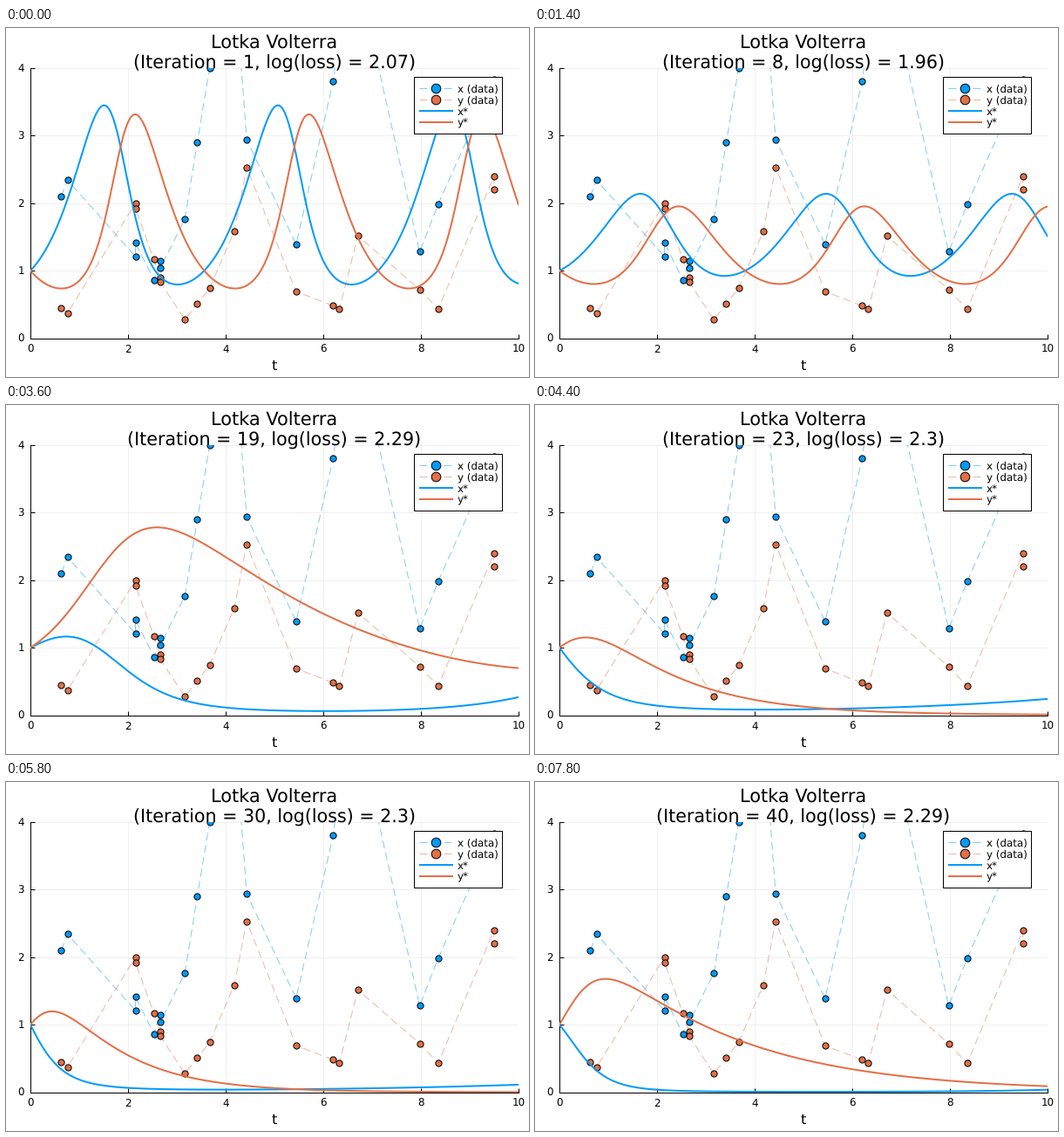
A matplotlib script for the animation above (8 s loop, 600 by 400 pixels).

```python
import numpy as np
import matplotlib.pyplot as plt
from matplotlib.animation import FuncAnimation
from matplotlib.patches import Rectangle

W, H, DPI = 600, 400, 100
PT = 72 / DPI
LEFT, RIGHT, TOP, BOTTOM = 28, 588, 46, 355.5
BLUE, ORANGE = "#009AFA", "#E36F47"
FRAMES, INTERVAL = 40, 200
T_END, STEPS = 10.0, 200
DT = T_END / STEPS

plt.rcParams.update({"font.family": "DejaVu Sans", "text.hinting": "none"})

# Noisy samples on a grid of 80 times: (grid index, x, y)
SAMPLES = [
    (5, 2.1, 0.45), (6, 2.34, 0.37), (17, 1.21, 2.0), (17, 1.41, 1.92),
    (20, 0.865, 1.165), (21, 1.145, 0.9), (21, 1.035, 0.83),
    (25, 1.765, 0.275), (27, 2.895, 0.505), (29, 4.0, 0.74),
    (33, 5.4, 1.585), (35, 2.94, 2.53), (43, 1.39, 0.69),
    (49, 3.805, 0.48), (50, 4.5, 0.43), (53, 5.38, 1.515),
    (63, 1.28, 0.72), (66, 1.985, 0.43), (75, 3.83, 2.395), (75, 3.5, 2.205),
]

# Training path: iteration, log(loss), then the model's a, b, c, d
PATH = [
    (1, 2.07, 1.80, 1.05, 1.89, 1.045),
    (8, 1.96, 1.586, 1.226, 1.773, 1.226),
    (14, 2.30, 0.21, 1.20, 0.525, 1.18),
    (19, 2.29, 1.135, 0.76, 0.278, 0.745),
    (26, 2.30, 0.085, 1.78, 1.36, 1.84),
    (34, 2.30, 0.61, 1.60, 0.475, 1.56),
    (40, 2.29, 0.743, 1.60, 0.362, 1.60),
]


def rates(u, p):
    x, y = u
    a, b, c, d = p
    return np.array([x * (a - b * y), y * (d * x - c)])


def solve(p):
    """RK4 paths from (1, 1), one for each column of p."""
    u = np.ones((2, p.shape[1]))
    path = [u]
    for _ in range(STEPS):
        k1 = rates(u, p)
        k2 = rates(u + DT / 2 * k1, p)
        k3 = rates(u + DT / 2 * k2, p)
        k4 = rates(u + DT * k3, p)
        u = u + DT / 6 * (k1 + 2 * k2 + 2 * k3 + k4)
        path.append(u)
    return np.array(path)


stops, stop_losses, *stop_params = np.array(PATH).T
iters = np.arange(1, FRAMES + 1)
losses = np.interp(iters, stops, stop_losses)
params = np.exp([np.interp(iters, stops, np.log(p)) for p in stop_params])
times = np.linspace(0, T_END, STEPS + 1)
curves = solve(params)

index, x_data, y_data = np.array(SAMPLES).T
t_data = index * T_END / 79

fig = plt.figure(figsize=(W / DPI, H / DPI), dpi=DPI, facecolor="white")


def label(x, y, text, size, ha="center", z=-1):
    return fig.text(x / W, 1 - y / H, text, fontsize=size, ha=ha,
                    va="baseline", zorder=z)


ax = fig.add_axes([LEFT / W, 1 - BOTTOM / H, (RIGHT - LEFT) / W, (BOTTOM - TOP) / H])
ax.patch.set_visible(False)
ax.set(xlim=(0, 10), ylim=(0, 4), xticks=range(0, 11, 2), yticks=range(5))
ax.set_axisbelow(True)
ax.grid(color="black", alpha=0.06, lw=PT)
ax.tick_params(direction="in", length=5 * PT, width=PT,
               labelbottom=False, labelleft=False)
for side, spine in ax.spines.items():
    spine.set(visible=side in ("left", "bottom"), linewidth=PT, zorder=1)

label(308, 23.7, "Lotka Volterra", 15)
subtitle = label(308, 46.5, "", 14.9)
label(308, 392, "t", 11.8)
for v in range(0, 11, 2):
    label(LEFT + 56 * v, 371.5, str(v), 8.6)
for v in range(5):
    label(21, BOTTOM - 77.4 * v + 4.4, str(v), 8.6, ha="right")

# Legend layer in pixel coordinates
key = fig.add_axes([0, 0, 1, 1], zorder=5)
key.set(xlim=(0, W), ylim=(H, 0))
key.axis("off")
key.add_patch(Rectangle((468, 56), 101.4, 65.3, fc="white", ec="black", lw=PT))


def dashed(axes, xs, ys, color):
    axes.plot(xs, ys, color=color, alpha=0.5, lw=PT, dashes=(9, 5),
              dash_capstyle="butt")


def dots(axes, xs, ys, color, size):
    axes.plot(xs, ys, "o", color=color, ms=size * PT, mec="black", mew=PT,
              snap=False)


def curve(axes, xs, ys, color):
    return axes.plot(xs, ys, color=color, lw=2 * PT)[0]


for n, (name, color, data) in enumerate([("x", BLUE, x_data), ("y", ORANGE, y_data)]):
    dashed(ax, t_data, data, color)
    dots(ax, t_data, data, color, 7.2)
    row = 69.4 + 13 * n
    dashed(key, [474, 512], [row, row], color)
    dots(key, [493], [row], color, 10.6)
    curve(key, [474.5, 511.5], [row + 26, row + 26], color)
    label(517.5, row + 4.3, f"{name} (data)", 8.6, ha="left", z=6)
    label(517.5, row + 30.3, f"{name}*", 8.6, ha="left", z=6)

lines = [curve(ax, [], [], c) for c in (BLUE, ORANGE)]


def draw(n):
    for s, line in enumerate(lines):
        line.set_data(times, curves[:, s, n])
    loss = round(float(losses[n]), 2)
    subtitle.set_text(f"(Iteration = {iters[n]}, log(loss) = {loss})")
    return [*lines, subtitle]


anim = FuncAnimation(fig, draw, frames=FRAMES, interval=INTERVAL,
                     repeat=True, repeat_delay=0, blit=False)
plt.show()
```
